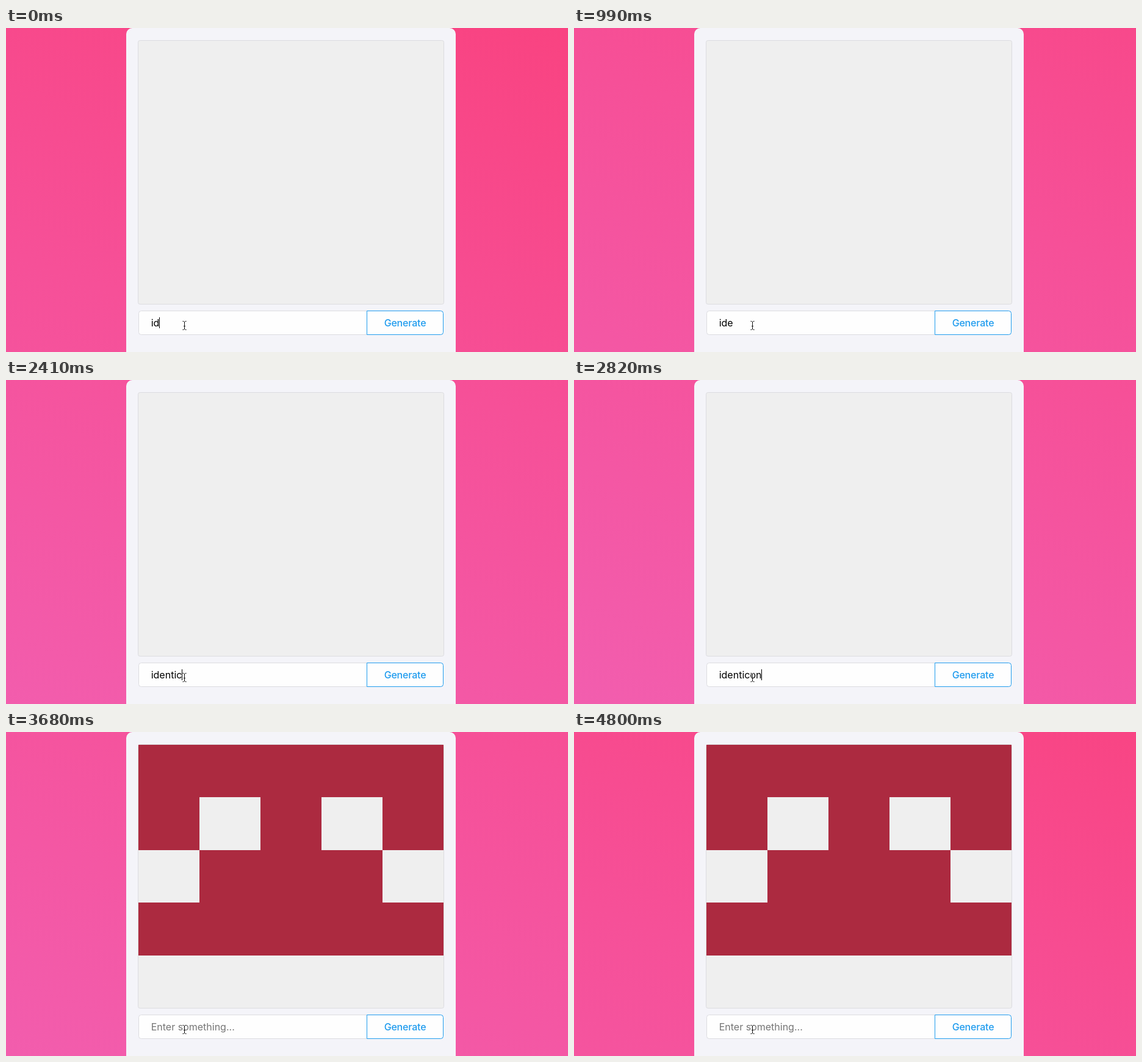
An HTML page with a canvas for the animation above (5.1 s loop, 921 by 532 pixels).

```html
<!DOCTYPE html>
<html lang="en">
<head>
<meta charset="utf-8">
<title>Identicon generator</title>
<style>
  html, body { margin: 0; width: 100%; height: 100%; overflow: hidden; }
  canvas { display: block; }
</style>
</head>
<body>
<canvas id="stage" width="921" height="532"></canvas>
<script>
const ctx = document.getElementById('stage').getContext('2d');
const W = 921, H = 532, LOOP = 5100;
const FONT = 'Inter, "Open Sans", sans-serif';
const BLUE = '#209cee', LINE = '#dcdce0', PANEL = '#efefef', FIELD = '#fefefe';

const WORD = 'identicon', HINT = 'Enter something...', TEXT_X = 237.7;
const KEYS = [570, 1260, 1520, 2000, 2410, 2620, 2820];
const SUBMIT = 3230;
const CARET_OFF = [[990, 1260], [3680, 4150], [4800, LOOP]];
const UPDATES = [0, ...KEYS, SUBMIT, ...CARET_OFF.flat()];

// Left half of each row including the middle column; the right half mirrors it.
const ICON = ['111', '101', '011', '111'];

function box(x, y, w, h, radius, fill, stroke) {
  ctx.beginPath();
  ctx.roundRect(x, y, w, h, radius);
  ctx.fillStyle = fill;
  ctx.fill();
  if (!stroke) return;
  ctx.strokeStyle = stroke;
  ctx.lineWidth = 1;
  ctx.stroke();
}

function label(text, x, color, weight = 400, align = 'left', spacing = 0) {
  ctx.font = `${weight} 16px ${FONT}`;
  ctx.textAlign = align;
  ctx.letterSpacing = spacing + 'px';
  ctx.fillStyle = color;
  ctx.fillText(text, x, 490);
}

// The gradient slows towards its turning point, then speeds up on the way back.
function drift(t) {
  const PEAK = 700;
  if (t < SUBMIT) return PEAK * (1 - (1 - t / SUBMIT) ** 1.6);
  return PEAK * (1 - ((t - SUBMIT) / 1700) ** 1.8);
}

// Colour changes along y - SLOPE * x.
function backdrop(shift) {
  const SLOPE = 0.37, norm = 1 + SLOPE * SLOPE;
  const point = s => [-SLOPE * (s - shift) / norm, (s - shift) / norm];
  const g = ctx.createLinearGradient(...point(-340), ...point(1232));
  g.addColorStop(0, 'rgb(249,67,129)');
  g.addColorStop(0.45, 'rgb(246,80,152)');
  g.addColorStop(1, 'rgb(242,94,175)');
  ctx.fillStyle = g;
  ctx.fillRect(0, 0, W, H);
}

function identicon() {
  const edge = row => Math.round(20.9 + row * 86.5);
  ctx.fillStyle = '#ac2a40';
  ICON.forEach((half, row) => {
    for (let col = 0; col < 5; col++) {
      if (half[Math.min(col, 4 - col)] === '0') continue;
      ctx.fillRect(217 + col * 100, edge(row), 100, edge(row + 1) - edge(row));
    }
  });
}

function pointer() {
  const beam = new Path2D(
    'M289.5 481.5 H291 L292.5 483 L294 481.5 H295.5' +
    'M292.5 483 V494 M291 489.5 H294' +
    'M289.5 495.5 H291 L292.5 494 L294 495.5 H295.5');
  for (const [color, width] of [['rgba(255,255,255,.8)', 2.5], ['#111', 1]]) {
    ctx.strokeStyle = color;
    ctx.lineWidth = width;
    ctx.stroke(beam);
  }
}

function draw(t) {
  const done = t >= SUBMIT;
  const typed = done ? '' : WORD.slice(0, 2 + KEYS.filter(k => k <= t).length);
  const hidden = CARET_OFF.some(([from, to]) => t >= from && t < to);

  backdrop(drift(Math.max(...UPDATES.filter(u => u <= t))));
  box(197, 0, 540, 560, 10, '#f4f4f9');
  box(216.5, 20.5, 501, 433, 3, PANEL, LINE);
  if (done) identicon();

  box(217.5, 464.5, 374, 39, [4, 0, 0, 4], FIELD, LINE);
  box(591.5, 464.5, 125, 39, [0, 4, 4, 0], FIELD, BLUE);
  label('Generate', 654, BLUE, 500, 'center', -0.2);
  label(typed || HINT, TEXT_X, typed ? '#000' : '#757575');

  if (!hidden) {
    ctx.fillStyle = '#000';
    ctx.fillRect(Math.round(TEXT_X + ctx.measureText(typed).width), 475, 1, 18);
  }
  pointer();
}

function tick() {
  draw(performance.now() % LOOP);
  requestAnimationFrame(tick);
}
tick();
</script>
</body>
</html>
```
